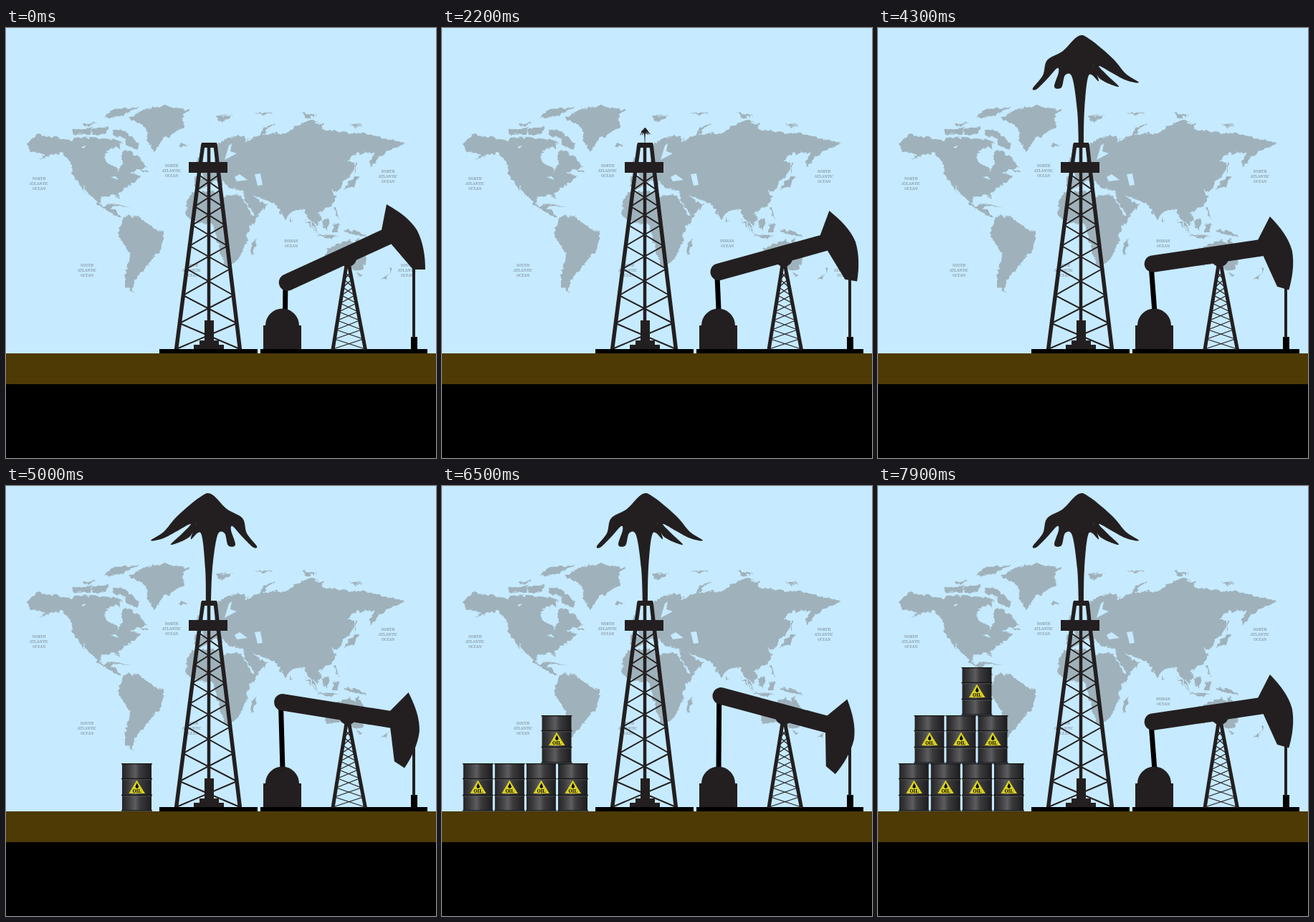
These frames come from a looping animation (600 px wide and 600 px high, 8000 ms). An HTML page:

```html
<!DOCTYPE html>
<html lang="en">
<head>
<meta charset="utf-8">
<title>Oil field</title>
<style>
  html, body { margin: 0; width: 100%; height: 100%; overflow: hidden; background: #000; }
  svg { display: block; width: 100vw; height: 100vh; }
  #labels text { font: bold 5px "Noto Serif", "Liberation Serif", serif; fill: #899ca5; text-anchor: middle; }
  .oil { font: 900 6.6px "Noto Serif", "DejaVu Serif", serif; text-anchor: middle; }
</style>
</head>
<body>
<svg viewBox="0 0 600 600">
  <defs>
    <linearGradient id="steel">
      <stop offset="0" stop-color="#242426"/>
      <stop offset=".2" stop-color="#3a3a3c"/>
      <stop offset=".45" stop-color="#5d5d5f"/>
      <stop offset=".6" stop-color="#3c3c3e"/>
      <stop offset="1" stop-color="#1c1c1e"/>
    </linearGradient>
    <!-- Roughens the coastlines -->
    <filter id="coast" x="0" y="0" width="600" height="600" filterUnits="userSpaceOnUse" color-interpolation-filters="sRGB">
      <feTurbulence type="fractalNoise" baseFrequency=".16" numOctaves="2" seed="4"/>
      <feDisplacementMap in="SourceGraphic" scale="7" xChannelSelector="R" yChannelSelector="G"/>
    </filter>
    <g id="barrel">
      <path d="M1 0H42V66H1Z" fill="url(#steel)"/>
      <path d="M0 .7H43M0 21.5H43M0 44.5H43M0 66H43" stroke="#151517" stroke-width="1.3"/>
      <path d="M2 22.8H41M2 45.8H41" stroke="#666" stroke-width=".6"/>
      <path d="M21.5 23.5L33 42H10.5Z" fill="#d9d11c"/>
      <path d="M21.8 27.5L23.8 31.7A2.2 2.2 0 1 1 19.8 31.7Z"/>
      <text class="oil" x="21.7" y="40.8">OIL</text>
    </g>
  </defs>

  <path d="M0 0H600V454H0Z" fill="#c6eaff"/>

  <g fill="#9fb2bb" filter="url(#coast)">
    <!-- North America -->
    <path d="M28 162L42 148 92 157 100 152 150 155 163 159 150 168 140 174 137 182 143 190 153 193 157 201 163 186 161 178 165 171 176 170 178 178 186 179 195 194 173 202 190 207 168 223 156 231 158 239 151 232 133 235 131 243 136 250 146 244 151 245 147 252 153 254 161 266 146 258 134 252 106 219 112 232 93 204 92 192 78 174 66 176 46 184 55 178 34 171Z"/>
    <path d="M170 126L180 119 200 112 222 108 257 115 247 121 248 138 217 157 207 174 196 156 198 145 190 135Z"/>
    <path d="M136 126L150 113 186 111 154 124ZM92 142L120 139 118 148 94 149ZM106 134L126 132 115 138ZM120 141L142 138 140 148 121 149Z"/>
    <path d="M149 142L165 143 185 162 181 169 166 164 168 156 150 150ZM150 162L161 162 158 168ZM188 195L199 201 190 201ZM144 245L164 247 174 250 160 249ZM241 162L257 163 246 167Z"/>
    <!-- South America -->
    <path d="M164 263L184 262 206 279 220 285 220 294 213 314 204 320 200 330 184 345 176 362 180 369 166 361 166 346 173 316 156 288Z"/>
    <!-- Europe and Asia -->
    <path d="M263 208L277 209 272 201 289 188 294 180 292 168 300 157 325 149 337 154 333 160 352 150 380 146V246L350 236 342 231 356 243 366 246 348 263 333 241 331 227 310 222 304 214 299 222 292 213 270 226 263 222ZM265 194L268 180 278 190Z"/>
    <path d="M375 148L392 147 402 138 425 128 444 135 437 141 476 146 500 147 557 161 532 172 518 183 510 194 507 185 516 174 490 175 476 184 485 188 486 198 471 214 465 229 453 226 460 236 455 248 436 258 440 268 434 277 428 268 436 287 422 264 414 253 397 257 390 267 375 246Z"/>
    <!-- Africa -->
    <path d="M262 229L290 227 303 235 327 232 343 262 353 260 336 285 337 298 327 318 318 329 306 332 297 308 290 274 262 271 250 259 254 239ZM343 300L350 294 344 317 340 313Z"/>
    <!-- Oceania -->
    <path d="M445 317L449 307 480 295 487 301 491 293 504 314 498 336 490 340 470 329 446 332ZM490 343H497L494 347ZM535 332L540 336 535 343ZM534 343L530 352 523 352Z"/>
    <path d="M417 268L424 272 433 287ZM432 288L464 291 450 294ZM440 270L450 264 453 271 446 283ZM456 274L464 273 463 285 456 284ZM472 281L492 284 503 292 479 287ZM457 250L461 251 464 268ZM396 266L400 270 396 271Z"/>
    <path d="M487 188L490 190 487 204ZM485 208H493L486 220 471 225ZM354 150L360 139 379 131 364 141 358 150ZM292 122L316 123 300 131ZM412 118L433 123 418 126ZM480 134L498 136 486 138ZM346 119L373 117 360 121Z"/>
  </g>
  <!-- Inland waters -->
  <path fill="#c6eaff" d="M319 208L326 204 337 212 322 214ZM347 204L355 203 358 219 351 220ZM311 164L315 161 313 172 322 175 305 184ZM146 208L153 207 157 212ZM139 171H152L146 176ZM105 166L112 164 108 168Z"/>

  <g id="labels"></g>
  <path d="M0 454H600V497H0Z" fill="#4d3a05"/>
  <path d="M0 497H600V600H0Z"/>

  <g id="barrels"></g>
  <path id="spout" fill="#231f20"/>

  <!-- Derrick -->
  <g fill="none" stroke="#231f20">
    <path id="brace" stroke-width="2"/>
    <path d="M275 162L269.5 202 237.5 449M292 162L296.5 202 326.5 449" stroke-width="5.5"/>
    <path d="M283 164V410" stroke-width="4.5"/>
  </g>
  <path fill="#231f20" d="M273 160H294L295 167H272ZM255 187H309V202H255ZM277 408H290V436H297V442H304V448H262V442H270V436H277Z"/>
  <path d="M214 448H351V454H214ZM355 448H588V454H355ZM565 431H574V449H565Z"/>

  <!-- Pump -->
  <path id="crank" stroke="#000" stroke-width="7"/>
  <path d="M359 448V415H362A23.5 23.5 0 0 1 409 415H412V448Z" fill="#231f20"/>
  <g fill="none" stroke="#231f20">
    <path id="lattice" stroke-width="1.2"/>
    <path d="M475.5 328L456 449M478 328L501.5 449" stroke-width="5"/>
    <path d="M569 335V432" stroke-width="4"/>
  </g>
  <circle cx="477" cy="321" r="12" fill="#231f20"/>
  <g id="beam" fill="#231f20">
    <path d="M392.5 355L532 291" stroke="#231f20" stroke-width="23.5" stroke-linecap="round"/>
    <path d="M531 246C550 257 564 267 574 283C582 299 585 318 585 337H568L538 302 524 282Z"/>
  </g>
</svg>
<script>
const $ = id => document.getElementById(id);

const atlantic = " ATLANTIC OCEAN";
const oceans = [
  [46, 212, "NORTH" + atlantic], [231, 194, "NORTH" + atlantic], [533, 202, "NORTH" + atlantic],
  [398, 299, "INDIAN OCEAN"],
  [113, 333, "SOUTH" + atlantic], [259, 333, "SOUTH" + atlantic], [560, 333, "SOUTH" + atlantic]
];
$("labels").innerHTML = oceans.map(([x, y, name]) =>
  name.split(" ").map((word, i) => `<text x="${x}" y="${y + 7 * i}">${word}</text>`).join("")
).join("");

// Smooth curve through a string of x,y pairs
function smooth(text) {
  const pts = text.split(" ").map(p => p.split(",").map(Number));
  const at = i => pts[Math.max(0, Math.min(pts.length - 1, i))];
  const lean = (i, k) => at(i).map((v, j) => v + k * (at(i + 1)[j] - at(i - 1)[j]) / 6);
  return "M" + pts[0] + pts.slice(1).map((p, i) =>
    `C${lean(i, 1)} ${lean(i + 1, -1)} ${p}`).join("") + "Z";
}
$("spout").setAttribute("d", smooth(
  "280,162 278,115 271,69 261,66 256,83 246,82 252,62 250,56 238,69 222,85 216,84 " +
  "230,66 236,45 258,32 280,11 296,16 327,42 346,64 364,76 344,72 309,53 " +
  "320,66 336,82 310,71 300,51 308,74 294,66 288,115 287,162"));

// Crossed struts between two sloping legs
function struts(levels, left, right) {
  return levels.slice(1).map((y, i) => {
    const top = levels[i];
    return `M${left(top)} ${top}L${right(y)} ${y}M${right(top)} ${top}L${left(y)} ${y}`;
  }).join("");
}
$("brace").setAttribute("d", struts([205, 226, 249, 275, 304, 336, 373, 412, 448],
  y => 269.5 - (y - 202) * 0.13, y => 296.5 + (y - 202) * 0.122));
$("lattice").setAttribute("d", struts([341, 351, 362, 373, 384, 396, 408, 421, 434, 448],
  y => 475.5 - (y - 328) * 0.161, y => 478 + (y - 328) * 0.194));

// Rows of 4, 3 and 1 barrels, filled from the right
const slots = [[161, 387, 4], [138.5, 320, 3], [116.5, 253, 1]];
$("barrels").innerHTML = slots.map(([x, y, n]) => Array.from({ length: n }, (_, i) =>
  `<use href="#barrel" transform="translate(${x - 44.1 * i} ${y})"/>`).join("")).join("");
const barrels = [...$("barrels").children];

const tilt = [0, 4.6, 9.2, 13, 16.2, 21.5, 27.5, 33.7, 39.7, 45];

// Beam stage from 0 (head up) to 9 (head down)
function beamStage(step) {
  const early = step < 39;
  const m = early ? step % 20 : (step - 39) % 18;
  return m < 10 ? m : (early ? 19 : 18) - m;
}

function drawPump(step) {
  const stage = beamStage(step), angle = tilt[stage];
  const sway = Math.sin(stage / 9 * Math.PI), dx = -3 * sway, dy = -sway;
  $("beam").setAttribute("transform", `translate(${dx} ${dy}) rotate(${angle} 477 321)`);
  const a = angle * Math.PI / 180, c = Math.cos(a), s = Math.sin(a);
  const x = 477 + dx - 84.5 * c - 34 * s - 2.5, y = 321 + dy - 84.5 * s + 34 * c;
  $("crank").setAttribute("d", `M${x} ${y}L${386 + Math.max(0, 3.5 - 1.7 * stage)} 396`);
}

function drawSpout(step) {
  const grow = step - 22, full = step >= 30;
  const sx = full ? (step % 2 ? 1 : -1) : 0.1 + 0.083 * grow;
  const sy = full ? 1 : 0.14 + 0.115 * grow;
  $("spout").setAttribute("transform",
    `translate(283 160) scale(${sx} ${sy}) translate(-283 -160)`);
  $("spout").style.display = step > 20 ? "" : "none";
}

let start;
function frame(now) {
  start ??= now;
  const step = Math.floor((now - start) % 8000 / 100);
  drawPump(step);
  drawSpout(step);
  barrels.forEach((b, i) => b.style.display = step >= 48 + 4 * i ? "" : "none");
  requestAnimationFrame(frame);
}
requestAnimationFrame(frame);
</script>
</body>
</html>
```
